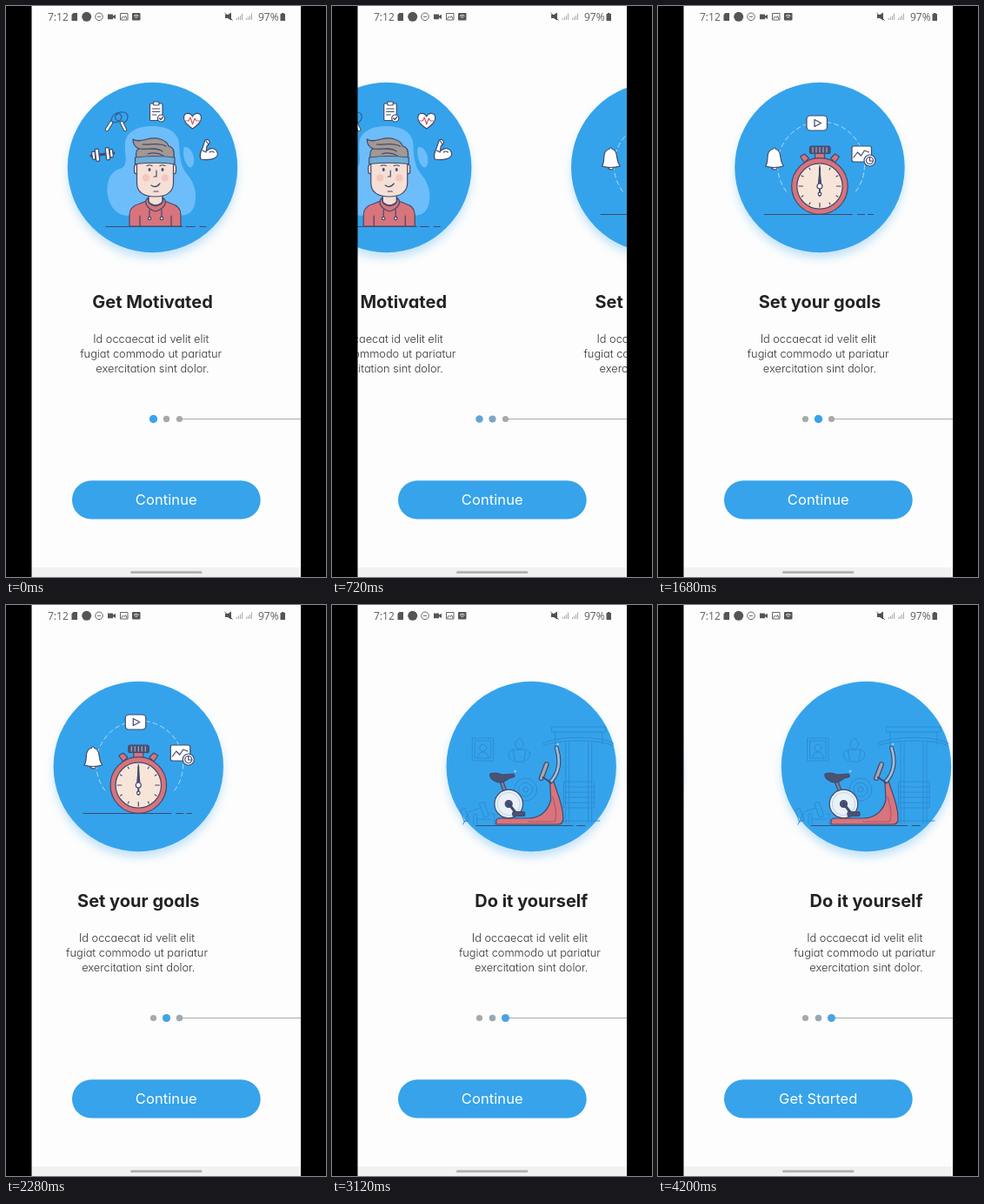
These frames come from a looping animation (368x656 px, 4320 ms). An HTML page:

```html
<!DOCTYPE html>
<html lang="en">
<head>
<meta charset="utf-8">
<title>Onboarding slider</title>
<style>
  html, body { margin: 0; width: 100%; height: 100%; overflow: hidden; background: #000; }
  svg { display: block; width: 368px; height: 656px; }
  text { font-family: Inter, sans-serif; font-feature-settings: "cv11"; text-anchor: middle; }
  .title { font-size: 20px; font-weight: 700; fill: #222; }
  .body { font-size: 12.8px; font-weight: 300; fill: #333; }
  .button { font-size: 16.5px; fill: #fff; letter-spacing: .1px; }
  .status text { font: 12px "Noto Sans", sans-serif; fill: #666; text-anchor: start; }
  .art { stroke: #414a6c; stroke-width: 1.2; stroke-linecap: round; stroke-linejoin: round; fill: none; }
  .white { fill: #fff; }
  .red { fill: #d8747c; }
  .skin { fill: #f5dfd6; }
  .dark { fill: #4b5274; }
  .faint { stroke: #2c8cd3; stroke-width: 1; }
  .plain { stroke: none; }
</style>
</head>
<body>
<svg viewBox="0 0 368 656">
  <defs>
    <filter id="glow" x="-20%" y="-20%" width="140%" height="140%">
      <feDropShadow dx="0" dy="7" stdDeviation="5" flood-color="#36a3eb" flood-opacity=".28"/>
    </filter>
    <g id="base">
      <circle cy="185.5" r="97.7" fill="#36a3eb" filter="url(#glow)"/>
      <text class="body">
        <tspan x="0" y="387">Id occaecat id velit elit</tspan>
        <tspan x="0" y="404">fugiat commodo ut pariatur</tspan>
        <tspan x="0" y="421">exercitation sint dolor.</tspan>
      </text>
    </g>
  </defs>
  <rect x="29" width="311" height="656" fill="#fdfdfd"/>

  <g class="slide" data-rest="16">
    <use href="#base" x="168.5"/>
    <text class="title" x="168.5" y="347">Get Motivated</text>
    <g class="art">
      <g class="plain" fill="#6dbdfa">
        <path d="M137 158C138 143 154 138 168 138C184 138 198 144 199 158C200 172 200 183 208 193C217 203 221 218 216 231C211 243 199 241 186 241H141C128 241 120 232 117 218C115 204 119 190 131 187C142 184 136 171 137 158Z"/>
        <path d="M205 162C212 161 217 171 216 179C215 187 211 187 208 182C204 176 203 168 205 162Z"/>
      </g>
      <path d="M115 253.5H203M207 253.5H217M223 253.5H230"/>
      <path class="red" d="M142 253V240C142 232 147 229 154 227L164 223H180L190 227C197 229 201 233 201 240V253Z"/>
      <path d="M154 253V241M190 253V241"/>
      <path class="skin" d="M164 213V225Q172 233 180 225V213Z"/>
      <path class="red" d="M164 220C158 224 160 232 172 236C184 232 186 224 180 220C182 226 178 229 172 230C166 229 162 226 164 220Z"/>
      <path d="M165 234V243M179 234V243"/>
      <circle class="white" cx="165" cy="244" r="1.7"/><circle class="white" cx="179" cy="244" r="1.7"/>
      <rect class="skin" x="147.5" y="182" width="6" height="11" rx="3"/>
      <rect class="skin" x="190" y="182" width="5.5" height="11" rx="3"/>
      <path class="skin" d="M150.500 178H192.500V203C192.500 214 184 219 172 219C159 219 150.500 214 150.500 203Z"/>
      <g class="plain">
        <circle cx="161" cy="197.500" r="4" fill="#f4c5bd"/><circle cx="183" cy="197.500" r="4" fill="#f4c5bd"/>
        <ellipse class="dark" cx="165" cy="188" rx="1.500" ry="2"/><ellipse class="dark" cx="180" cy="188" rx="1.500" ry="2"/>
      </g>
      <path d="M162 183.500Q165 182 168 183.500M177 183.500Q180 182 183 183.500M173 189V196H170M167 206Q172 210 177 204M170 213H175"/>
      <path fill="#a29894" d="M150 175C149 169 150 165 153 164C148 162 146 158 146 153C150 156 155 155 162 153C174 150 185 154 187 161C193 162 194 168 193 175Z"/>
      <path d="M153 164C162 166 172 161 180 167M157 159C166 160 175 156 184 161M163 170Q172 167 181 172"/>
      <path fill="#6eaed7" d="M148.500 174Q171 171 194 174V181.500Q171 179 148.500 181.500Z"/>

      <g class="white" transform="rotate(-7 111 170.500)">
        <path d="M98 170.500H124" stroke-width="3"/>
        <rect x="99" y="166" width="3.500" height="9" rx="1"/><rect x="103" y="163.500" width="4" height="14" rx="1"/>
        <rect x="115" y="163.500" width="4" height="14" rx="1"/><rect x="119.500" y="166" width="3.500" height="9" rx="1"/>
      </g>
      <path d="M121 134C120 126 127 121 135 122C142 123 141 131 136 134M122 133C128 136 136 129 132 125C127 121 121 130 131 133" stroke="#315c94"/>
      <path d="M121 134L116 142M133 134L137 142" stroke-width="4.400"/>
      <path d="M121 134L116 142M133 134L137 142" stroke="#fff" stroke-width="2.400"/>
      <rect class="white" x="165.500" y="112" width="14.500" height="19.500" rx="1"/>
      <rect class="white" x="169.500" y="110" width="6.500" height="4" rx="1"/>
      <path d="M168.500 118H177M168.500 121.500H177M168.500 125H173"/>
      <circle class="white" cx="178.500" cy="129" r="4"/><path d="M176.500 129L178 130.500L180.500 127.500"/>
      <path class="white" d="M214.500 141C207 136 204 132 204.500 128C205 122 212 122 214.500 127C217 122 224 122 224.500 128C225 132 222 136 214.500 141Z"/>
      <path d="M206 132H210L212 128L214.500 136L217 129L219 132H223" stroke="#c4626e"/>
      <path class="white" d="M224 176C222 171 224 167 226 163L229 154C232 152 235 155 234 158L231 161L230 167C235 162 241 163 243 168C245 174 238 178 224 176Z"/>
      <path d="M226 166L230 168M230 155L233 159M234 168Q237 166 239 168"/>
    </g>
  </g>

  <g class="slide" data-rest="342">
    <use href="#base" x="152.5"/>
    <text class="title" x="152.500" y="347">Set your goals</text>
    <g class="art">
      <path d="M114 213A50 50 0 1 1 194 213" stroke="#b6dcf8" stroke-width="1" stroke-dasharray="5 4"/>
      <path d="M89 239.500H190M196 239.500H204M208 239.500H214"/>
      <rect class="white" x="137.500" y="126" width="23.500" height="17" rx="4"/>
      <path d="M146.500 130.500V138.500L154 134.500Z"/>
      <path class="white" d="M90 184C93 181 92 175 93 170C94 166 96 165 98.500 164.500Q100 161 102 164.500C106 165 107 169 107.500 174C108 180 109 181 111 184Q100 187 90 184Z"/>
      <path class="white" d="M97 186Q101 190 104 186"/>
      <rect class="white" x="189.500" y="161" width="22.500" height="18" rx="2"/>
      <path d="M191.500 174L196 168L200 172L204 166L209 168"/>
      <circle class="white" cx="210" cy="177.500" r="6.500"/><circle cx="210" cy="177.500" r="4"/><path d="M210 174V178H213"/>
      <path class="red" d="M130 173L135 170L140 175L135 180ZM175 173L170 170L165 175L170 180Z"/>
      <rect class="red" x="147" y="168" width="11" height="8"/>
      <rect class="dark" x="141" y="161" width="23.500" height="8.500" rx="2"/>
      <path d="M144.500 162.500V168M148.500 162.500V168M152.500 162.500V168M156.500 162.500V168M160.500 162.500V168" stroke="#a8a7b6"/>
      <circle class="red" cx="152.500" cy="207" r="32.300"/>
      <circle cx="152.500" cy="207" r="26.200" fill="#f8e5da"/>
      <g id="ticks"></g>
      <path d="M152.500 218V186" stroke-width="2"/>
      <path class="dark" d="M151 204L152.500 188L154 204Z"/>
      <circle class="white" cx="152.500" cy="207" r="3"/><circle class="white" cx="152.500" cy="216" r="1.800"/>
    </g>
  </g>

  <g class="slide" data-rest="620">
    <use href="#base" x="184.500"/>
    <text class="title" x="184.500" y="347">Do it yourself</text>
    <g class="art">
      <g class="faint">
        <path d="M117 153H141V179H117ZM120 156H138V176H120ZM123 176Q123 169 129 169Q135 169 135 176"/>
        <circle cx="129" cy="164" r="4"/>
        <path d="M164 166H178L176 180H166ZM171 166C162 163 167 155 171 153C176 157 178 163 171 166M164 166C156 168 157 176 163 179M178 166C185 168 184 176 178 179"/>
        <circle cx="178" cy="212" r="13"/><circle cx="178" cy="212" r="8"/><circle cx="178" cy="212" r="3"/>
        <path d="M208 140H270V146H208ZM212 146V160M266 146V160M198 159C213 150 265 150 279 159M198 162C213 154 265 154 279 162M224 158V250M228 158V250M250 158V250M254 158V250M222 203H257V233H222ZM222 209H257M222 215H257M222 221H257M222 227H257M217 248H263"/>
        <path d="M103 236L108 233L113 247L108 249ZM112 238L126 233M125 228L130 226L136 242L131 244ZM118 252V240H122V252M122 246H138M138 240H142V252M106 252L112 240"/>
      </g>
      <path d="M121 253.500H232M237 253.500H246"/>
      <path class="red" d="M144 252V248Q144 245 149 245H181C195 245 204 236 207 224L206 204L210 202C213 213 222 231 221 246Q221 252 215 252Z"/>
      <path d="M181 249H211C215 243 212 230 209 220" stroke="#b75568"/>
      <path d="M150 202L156 219" stroke-width="5"/><path d="M150 202L156 219" stroke="#777e99" stroke-width="2.600"/>
      <path class="dark" d="M137 194Q144 192 151 195L164 194Q167 197 163 198C156 199 155 204 149 204C143 204 136 199 137 194Z"/>
      <circle cx="158.500" cy="228.500" r="16.300" fill="#e8f1f7"/>
      <circle cx="158.500" cy="228.500" r="13" stroke="#c5d8e6"/>
      <circle class="dark" cx="158.500" cy="228.500" r="4"/>
      <path d="M158.500 228.500L167 239" stroke-width="3"/>
      <rect class="dark" x="163" y="237.500" width="14" height="5" rx="1.500"/>
      <path d="M213.500 164C218 178 217 192 207 203" stroke-width="5"/>
      <path d="M213.500 164C218 178 217 192 207 203" stroke="#9ac0db" stroke-width="2.700"/>
      <path d="M202 183L196 199" stroke-width="6"/><path d="M202 183L196 199" stroke="#a8a6af" stroke-width="3.500"/>
      <path d="M198 198L207 204" stroke-width="2"/>
      <path d="M214 160H216M215 159V161M165 191H167M166 190V192" stroke="#a9d8f8" stroke-width="1"/>
    </g>
  </g>

  <path d="M199 474.500H340" stroke="#aaa"/>
  <g id="dots">
    <circle cx="169.500" cy="474.500"/><circle cx="184.500" cy="474.500"/><circle cx="199.500" cy="474.500"/>
  </g>

  <rect x="76" y="545.300" width="216.700" height="44.200" rx="22" fill="#36a3eb"/>
  <text id="label" class="button" x="184.300" y="573"></text>

  <g class="status" fill="#555">
    <text x="48" y="16.500">7:12</text>
    <path d="M77.500 8H82V17H75.500V10Z"/>
    <circle cx="92.700" cy="12.300" r="5.500"/>
    <circle cx="107" cy="12.300" r="4.300" fill="none" stroke="#666"/><path d="M105 12.300H109" stroke="#666"/>
    <path d="M117 9.500H123V11.500L126 9.800V15L123 13.300V15.300H117Z"/>
    <path d="M131.500 8.500H140V16H131.500ZM132.500 15L134.500 12L136 13.500L137.500 11.500L139 15" fill="none" stroke="#666"/>
    <rect x="145" y="8" width="9.500" height="8.500" rx="1"/>
    <path d="M147 11.500Q149.700 9 152.500 11.500M148.300 13.300Q149.700 12 151.200 13.300" fill="none" stroke="#fff"/>
    <path d="M252 10H255L259 7.500V16.500L255 14H252Z"/><path d="M251.500 8L260.500 16.500" stroke="#444"/>
    <g fill="none" stroke="#aaa">
      <path d="M265.500 16V14M267.500 16V12.500M269.500 16V11M271.500 16V8.500"/>
      <path d="M276.500 16V14M278.500 16V12.500M280.500 16V11M282.500 16V8.500"/>
    </g>
    <text x="290" y="16.500">97%</text>
    <path d="M315.500 9H317V8H319.500V9H321V17H315.500Z"/>
  </g>

  <rect x="29" y="645" width="311" height="11" fill="#f1f1f1"/>
  <rect x="143" y="649.300" width="82.500" height="2.800" rx="1.400" fill="#b1b1b1"/>
  <path d="M0 0H29.500V656H0ZM339 0H368V656H339Z"/>
</svg>
<script>
const LOOP = 4320, STEP = 120, PAGE = 310;
const GRAY = [169, 169, 169], BLUE = [54, 163, 235];
const linear = u => u;
const pull = u => u ** 1.8;
const snap = u => Math.sin(u * Math.PI / 2);

// Swipes: start time, end time, scroll from, scroll to, easing
const swipes = [
  [0, 360, 16, 79.5, linear],
  [360, 1080, 79.5, 164, linear],
  [1080, 1740, 164, 310, snap],
  [1860, 2760, 310, 437, pull],
  [2760, 3420, 437, 620, snap],
  [3780, 4200, 620, 565, pull]
];
const slides = document.querySelectorAll(".slide");
const dots = document.querySelectorAll("#dots circle");
const label = document.getElementById("label");
const mix = (a, b, u) => a + (b - a) * u;

document.getElementById("ticks").innerHTML = Array.from({ length: 12 }, (_, i) =>
  `<path d="M152.5 ${i % 3 ? 185 : 187.5}V183" transform="rotate(${i * 30} 152.5 207)"/>`).join("");

function scrollAt(t) {
  const [start, end, from, to, ease] = swipes.findLast(swipe => swipe[0] <= t);
  return mix(from, to, ease(Math.min(1, (t - start) / (end - start))));
}

function draw(t) {
  const scroll = scrollAt(t);
  slides.forEach(slide =>
    slide.setAttribute("transform", `translate(${slide.dataset.rest - scroll} 0)`));
  dots.forEach((dot, i) => {
    const active = Math.max(0, 1 - Math.abs(scroll / PAGE - i));
    dot.setAttribute("r", mix(3.6, 4.7, active));
    dot.setAttribute("fill", `rgb(${GRAY.map((c, k) => Math.round(mix(c, BLUE[k], active)))})`);
  });
  label.textContent = t < 3600 ? "Continue" : "Get Started";
}

const begin = performance.now();
function tick() {
  const t = (performance.now() - begin) % LOOP;
  draw(Math.floor(t / STEP) * STEP);
  requestAnimationFrame(tick);
}
tick();
</script>
</body>
</html>
```
